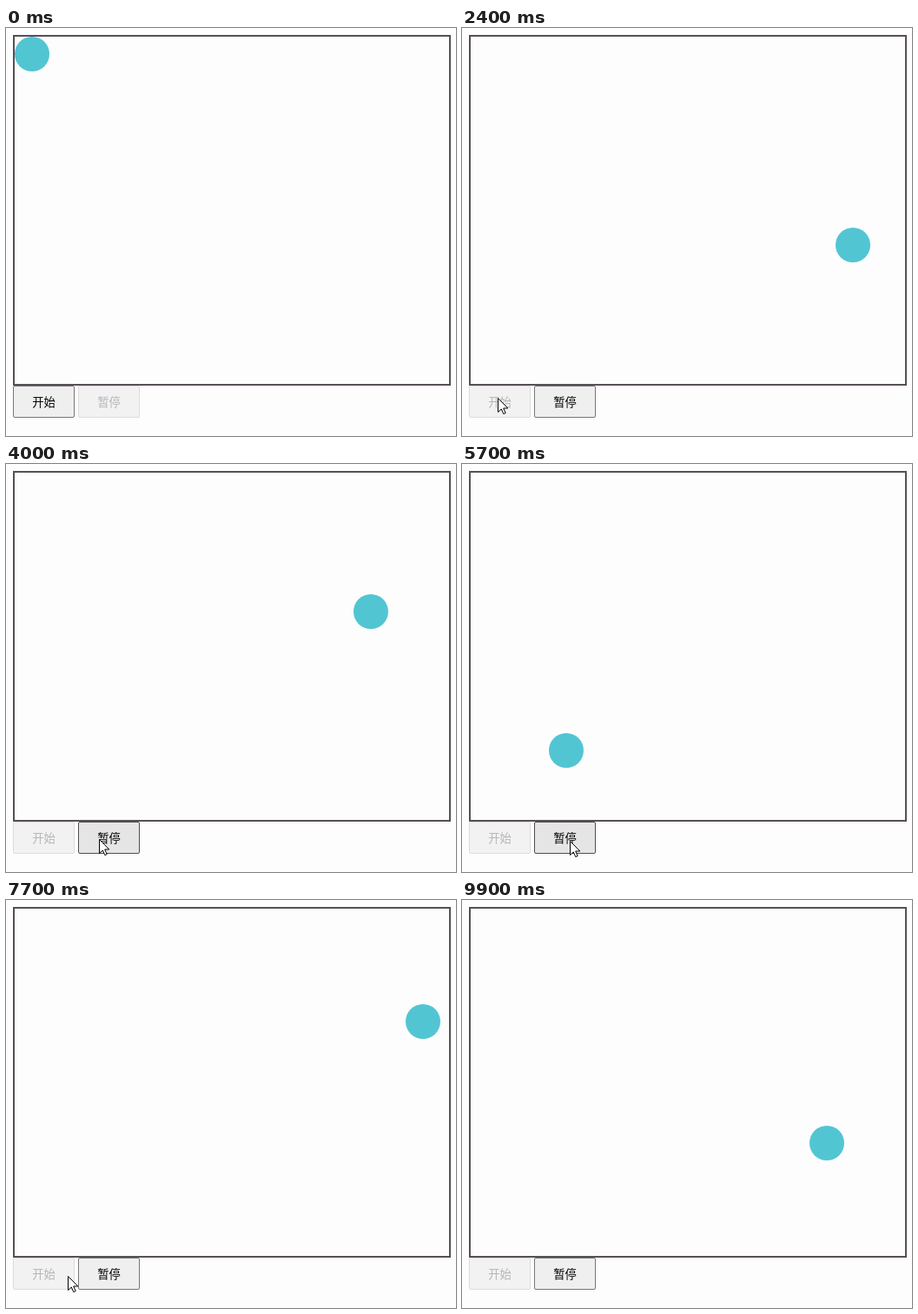
An HTML page that plays this animation: 518x470 px, repeating every 10000 ms.

```html
<!DOCTYPE html>
<html lang="zh-CN">
<head>
<meta charset="utf-8">
<title>弹球</title>
<style>
  html, body { margin: 0; width: 100%; height: 100%; overflow: hidden; background: #fdfdfd; }
  #box, #ball, .btn, #cursor { position: absolute; box-sizing: border-box; }
  #box { left: 8px; top: 8px; width: 504px; height: 404px; border: 2px solid #574f57; }
  #ball { left: 0; top: 0; width: 40px; height: 40px; border-radius: 50%; background: #52c5d3; }
  .btn {
    top: 412px; width: 71px; height: 37px;
    border: 1px solid #767676; border-radius: 2px; background: #efeff0; color: #000;
    font: 13.333px/35px "Noto Sans CJK SC", "Noto Sans CJK", sans-serif;
    text-align: center; white-space: nowrap;
  }
  .btn.hover { background: #e5e5e6; border-color: #4f4f4f; }
  .btn.off { background: #f2f2f2; border-color: #dcdcdc; color: #b5b5b8; }
  #start { left: 8px; }
  #pause { left: 83px; }
  #cursor { left: 0; top: 0; width: 14px; height: 21px; overflow: visible; }
</style>
</head>
<body>
<div id="box"><div id="ball"></div></div>
<div id="start" class="btn">开始</div>
<div id="pause" class="btn">暂停</div>
<svg id="cursor" viewBox="0 0 14 21">
  <path d="M.5 .5V16.5L4.3 13L6.8 18.6L9.2 17.5L6.7 12H11.8Z" fill="#fff" stroke="#000"/>
</svg>
<script>
  const LOOP = 10000, FRAME = 100, TICK = 20, STEP = 10, GLIDE = 500, ENTER = 500;
  const $ = id => document.getElementById(id);
  const ball = $('ball'), cursor = $('cursor'), start = $('start'), pause = $('pause');

  // Each run lasts from a click on start to a click on pause
  const runs = [[1400, 4080], [4900, 6260], [7200, 8220], [8700, LOOP]];

  // Pointer glides: when it sets off, and where to
  const home = { x: 216, y: 322 };
  const glides = [
    { at: 800, x: 41, y: 426 },
    { at: 3400, x: 107, y: 432 },
    { at: 4300, x: 48, y: 430 },
    { at: 5000, x: 124, y: 434 },
    { at: 6300, x: 55, y: 451 },
    { at: 6900, x: 45, y: 432 },
    { at: 7500, x: 118, y: 434 },
    { at: 8100, x: 19, y: 431 },
    { at: 8900, x: 518, y: 300 }
  ];

  const clamp = v => Math.min(1, Math.max(0, v));
  const ease = k => k * k * (3 - 2 * k);

  // Triangle wave: bounces between 0 and max
  const bounce = (n, max) => max - Math.abs(n % (2 * max) - max);

  const ticks = t => runs.reduce((sum, [from, to]) =>
    sum + Math.max(0, Math.floor((Math.min(t, to) - from) / TICK)), 0);

  const pointer = t => glides.reduce((p, g) => {
    const k = ease(clamp((t - g.at) / GLIDE));
    return { x: p.x + (g.x - p.x) * k, y: p.y + (g.y - p.y) * k };
  }, home);

  const move = (el, x, y) => {
    el.style.transform = `translate(${Math.round(x)}px, ${Math.round(y)}px)`;
  };

  function setButton(el, enabled, p) {
    const x = p.x - el.offsetLeft, y = p.y - el.offsetTop;
    const over = x >= 0 && x < el.offsetWidth && y >= 0 && y < el.offsetHeight;
    el.classList.toggle('off', !enabled);
    el.classList.toggle('hover', enabled && over);
  }

  function render(t) {
    const n = ticks(t);
    // The horizontal timer runs slightly ahead of the vertical one
    const nx = n + Math.round(n / 150);
    move(ball, bounce(nx, 46) * STEP, bounce(n, 36) * STEP);

    const p = pointer(t);
    cursor.style.visibility = t < ENTER ? 'hidden' : 'visible';
    move(cursor, p.x, p.y);

    const running = runs.some(([from, to]) => t >= from && t < to);
    setButton(start, !running, p);
    setButton(pause, running, p);
  }

  const origin = performance.now();
  function loop() {
    const t = (performance.now() - origin) % LOOP;
    render(Math.floor(t / FRAME) * FRAME);
    requestAnimationFrame(loop);
  }
  loop();
</script>
</body>
</html>
```
